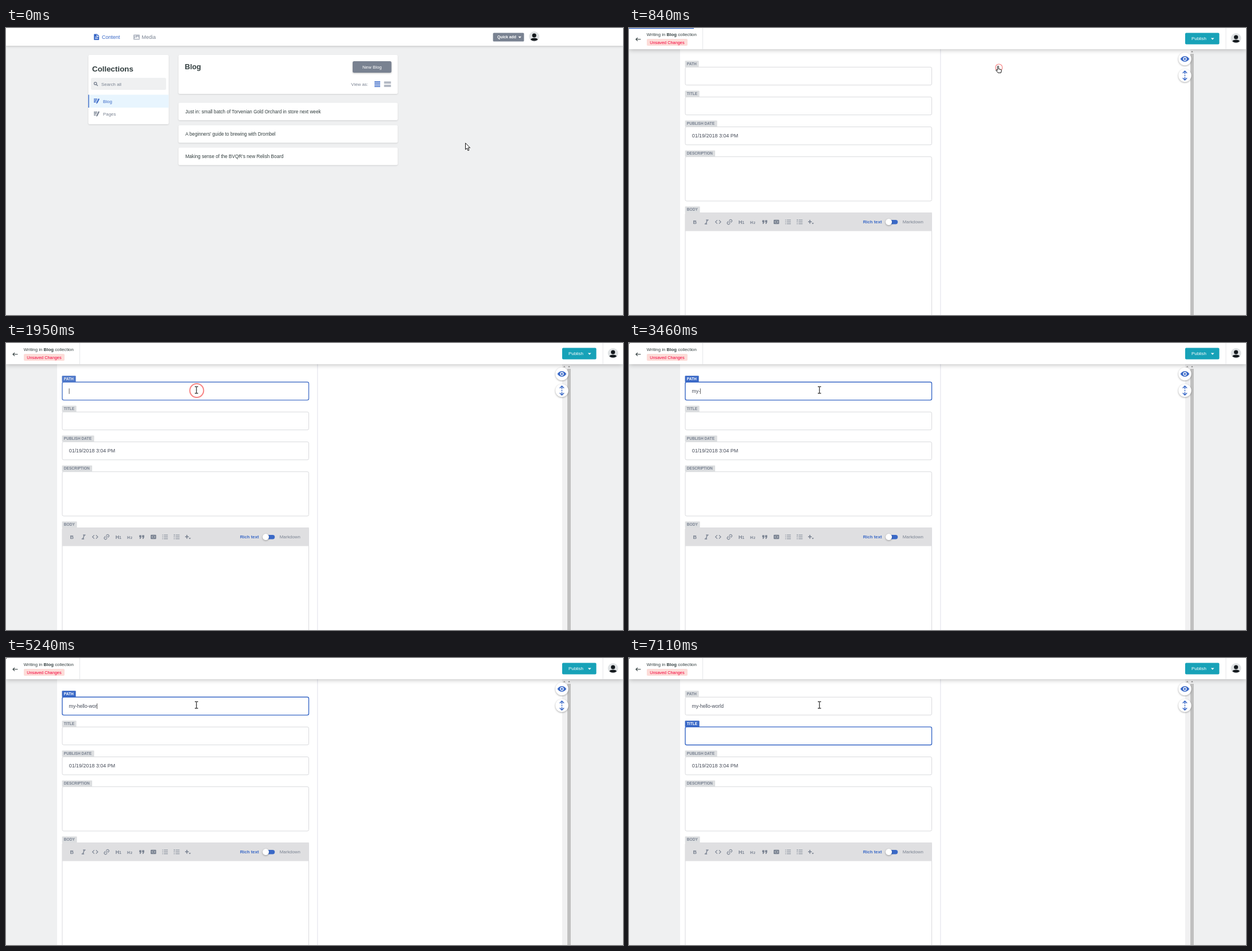
Animation of 1075x501 px, one loop 7990 ms. Source, as an HTML page:

```html
<!DOCTYPE html>
<html lang="en">
<head>
<meta charset="utf-8">
<title>New blog entry</title>
<style>
  html, body { margin: 0; width: 100%; height: 100%; overflow: hidden; background: #eff0f1; }
  svg { display: block; width: 100%; height: 100%; }
  text { font-family: "Liberation Sans", Arial, sans-serif; font-size: 7.9px; fill: #798291; white-space: pre; }
  .bold { font-weight: bold; }
  .blue { fill: #3a69c7; }
  .gray { fill: #798291; }
  .white { fill: #fff; }
  .dark { fill: #313d3e; }
  .card { fill: #fff; filter: drop-shadow(0 1px 1px #0002); }
  .entry { font-size: 8.2px; }
  .label { font-size: 6.6px; font-weight: bold; }
  .value { fill: #444a57; }
  .line { fill: none; stroke: #798291; stroke-width: 1.1; }
  .round { fill: #fff; filter: drop-shadow(0 1px 1.5px #0005); }
  .pointer { fill: #fff; stroke: #111; stroke-width: 1; stroke-linejoin: round; }
</style>
</head>
<body>
<svg viewBox="0 0 1075 501">
  <defs>
    <g id="avatar">
      <circle r="9" fill="#dfe2e4"/>
      <circle cy="-2" r="3.6" fill="#14191d"/>
      <path d="M-6.3 5.2Q-5.5 2.6 0 2.6T6.3 5.2Q3.5 7.6 0 7.6T-6.3 5.2Z" fill="#14191d"/>
    </g>
    <g id="write">
      <path d="M0 1.7H6M0 4.2H5M0 6.7H3.5" stroke="currentColor" stroke-width="1.4"/>
      <path d="M4.3 9.8L4.6 7.2L8 .3L10 1.3L6.5 8.2Z" fill="currentColor"/>
    </g>
  </defs>
  <rect width="1075" height="501" fill="#eff0f1"/>

  <g id="listPage">
    <rect width="1075" height="31" fill="#fff" style="filter:drop-shadow(0 1px 2px #0003)"/>
    <path class="blue" d="M154 10.5h5l3.2 3.2v6.5q0 .8-.8.8h-7.4q-.8 0-.8-.8v-8.9q0-.8.8-.8Z"/>
    <path d="M155.2 16h5M155.2 18.5h5M158.5 11.5v3h3" fill="none" stroke="#fff"/>
    <text class="blue" x="167" y="19" style="font-size:9px">Content</text>
    <rect x="222" y="11.5" width="11" height="9" rx="1" fill="#b3b9c4"/>
    <path d="M223.5 18.7l2.3-3 1.6 1.6 2.2-2.8 2.4 4.2Z" fill="#fff"/>
    <circle cx="225" cy="14" r="1" fill="#fff"/>
    <text x="236.5" y="19" style="font-size:9px">Media</text>
    <rect class="gray" x="848.5" y="8.5" width="54" height="15" rx="1.5"/>
    <text class="white bold" x="856" y="18.2" style="font-size:6.8px">Quick add</text>
    <path class="white" d="M892.5 14.8h5.4l-2.7 3Z"/>
    <use href="#avatar" x="920.3" y="15"/>

    <rect class="card" x="143.5" y="47" width="140" height="121" rx="2.5"/>
    <text class="dark bold" x="150" y="76" style="font-size:13.35px">Collections</text>
    <rect x="148" y="87" width="131" height="21" rx="2.5" fill="#eff0f1"/>
    <circle class="line" cx="155.7" cy="96.8" r="2.2" style="stroke-width:1.3"/>
    <path class="line" d="M157.4 98.5l2.5 2.5" style="stroke-width:1.5"/>
    <text x="166" y="100.5">Search all</text>
    <rect x="143.5" y="116.5" width="140" height="22.5" fill="#e8f5fe"/>
    <rect class="blue" x="143.3" y="116.5" width="1.4" height="22.5"/>
    <use href="#write" x="153" y="122.6" color="#3a69c7"/>
    <text class="blue" x="169" y="131">Blog</text>
    <use href="#write" x="153" y="145" color="#798291"/>
    <text x="169" y="153.3">Pages</text>

    <rect class="card" x="300.5" y="47" width="382" height="68" rx="2.5"/>
    <text class="dark bold" x="311.5" y="72" style="font-size:12.7px">Blog</text>
    <rect id="newButton" x="604" y="58" width="67.5" height="20" rx="2.5" style="filter:drop-shadow(0 1px 1.5px #0004)"/>
    <text class="white" x="637.8" y="70.8" text-anchor="middle">New Blog</text>
    <text x="601.3" y="101.2">View as:</text>
    <path d="M642 94.1h10M642 96.8h10M642 99.5h10M642 102.2h10" stroke="#3a69c7" stroke-width="1.6"/>
    <path d="M661 95.3h2M667 95.3h2M661 101h2M667 101h2" stroke="#b3b9c4" stroke-width="4" stroke-linecap="square" transform="translate(-.3 0)" stroke-linejoin="round"/>
    <rect class="card" x="300.5" y="130.5" width="382" height="30.5" rx="2.5"/>
    <text class="dark entry" x="312.5" y="148.6">Just in: small batch of Torvenian Gold Orchard in store next week</text>
    <rect class="card" x="300.5" y="169.7" width="382" height="30.5" rx="2.5"/>
    <text class="dark entry" x="312.5" y="187.7">A beginners’ guide to brewing with Drombel</text>
    <rect class="card" x="300.5" y="208.8" width="382" height="30.5" rx="2.5"/>
    <text class="dark entry" x="312.5" y="226.8">Making sense of the BVQR’s new Relish Board</text>
  </g>

  <g id="editPage">
    <rect x="89" y="37" width="889" height="464" fill="#fff"/>
    <g id="innerScroll">
      <rect x="969" y="37" width="9" height="464" fill="#f1f1f2"/>
      <path d="M970.8 42.3h4l-2-2.3Z" fill="#999"/>
    </g>
    <rect x="978" y="37" width="6.5" height="464" fill="#f1f1f2"/>
    <rect x="978" y="45" width="6" height="456" fill="#c0c0c0"/>
    <path d="M979 42.3h4l-2-2.3Z" fill="#888"/>
    <path d="M542.8 37v464" stroke="#dfe0ea"/>
    <rect width="1075" height="37" fill="#fff" style="filter:drop-shadow(0 1px 4px #0004)"/>
    <path d="M128.5 0v37M1040 0v37" stroke="#e6e7ea"/>
    <path d="M20.5 19.8h-8.5m3-2.8l-3 2.8l3 2.8" fill="none" stroke="#313d3e" stroke-width="1.1"/>
    <text class="dark" x="30.8" y="14.2" style="font-size:7.85px">Writing in <tspan class="bold">Blog</tspan> collection</text>
    <rect x="31" y="19" width="71" height="12" rx="2" fill="#fcdcd8"/>
    <text x="36.2" y="27.7" style="font-size:7.35px;fill:#f5003b">Unsaved Changes</text>
    <rect x="969" y="8.5" width="59.5" height="20" rx="2" fill="#17a2b8"/>
    <text class="white" x="980" y="21.2">Publish</text>
    <path class="white" d="M1013.8 17.4h5.8l-2.9 3.2Z"/>
    <use href="#avatar" x="1057.6" y="18"/>

    <circle class="round" cx="968.5" cy="54" r="11.2"/>
    <path class="blue" d="M960.7 54Q963.5 49.2 968.5 49.2T976.3 54Q973.5 58.8 968.5 58.8T960.7 54Z"/>
    <circle cx="968.5" cy="54" r="2.5" fill="#3a69c7" stroke="#fff" stroke-width="1.3"/>
    <circle class="round" cx="968.5" cy="83" r="11.2"/>
    <path d="M964.8 78.7l3.7-3.7l3.7 3.7M964.8 87.3l3.7 3.7l3.7-3.7M968.5 75.5v5M968.5 82v2M968.5 85.5v5" fill="none" stroke="#3a69c7" stroke-width="1.5"/>

    <g id="fields"></g>
    <text class="value" x="109.7" y="191" style="font-size:8.95px">01/19/2018 3:04 PM</text>
    <text class="value" id="path" x="109.6" y="87" style="font-size:8.5px"></text>
    <rect id="caret" y="79.3" width=".8" height="9.6" fill="#333"/>

    <rect x="97.8" y="322" width="430" height="32.5" fill="#dfdfe1"/>
    <text class="bold" x="111.6" y="342" style="font-size:9px">B</text>
    <path class="line" d="M134.2 335.3h4.3M131.8 342h4.3M136.5 335.3l-2.6 6.7" style="stroke-width:1.4"/>
    <path class="line" d="M153.8 335.3l-3.2 3.2l3.2 3.2M156.8 335.3l3.2 3.2l-3.2 3.2"/>
    <g transform="rotate(-45 175.3 338.5)"><path class="line" d="M174.5 336.3h-2a2.2 2.2 0 0 0 0 4.4h2M176 336.3h2a2.2 2.2 0 0 1 0 4.4h-2M173.2 338.5h4.2"/></g>
    <text class="bold" x="190.8" y="342" style="font-size:9px">H<tspan style="font-size:6.5px">1</tspan></text>
    <text class="bold" x="211" y="342.4" style="font-size:7px">H<tspan dx=".6" style="font-size:6px">2</tspan></text>
    <path class="gray" d="M232.2 335.5h3.6v3.6l-1.5 3h-1.7l1.2-2.8h-1.6ZM237.2 335.5h3.6v3.6l-1.5 3h-1.7l1.2-2.8h-1.6Z"/>
    <rect class="gray" x="252" y="334.8" width="9.6" height="7.5" rx="1.2"/>
    <path d="M255.8 336.7l-1.8 1.8l1.8 1.8M257.8 336.7l1.8 1.8l-1.8 1.8" fill="none" stroke="#dfdfe1"/>
    <path class="line" d="M275 335.2h7M275 338.5h7M275 341.8h7M272.2 335.2h1.5M272.2 338.5h1.5M272.2 341.8h1.5M295.4 335.2h7M295.4 338.5h7M295.4 341.8h7M293.2 334v2.6M292.3 338.5h1.7M292.3 341.8h1.7"/>
    <path class="line" d="M312 338.3h6.4M315.2 335.1v6.4" style="stroke-width:1.6"/>
    <path class="gray" d="M318.2 340.2h4l-2 2.2Z"/>
    <text class="blue bold" x="407.7" y="341.3" style="font-size:7.8px">Rich text</text>
    <rect class="blue" x="448.5" y="335" width="19.8" height="7.4" rx="3.7"/>
    <circle class="round" cx="452.6" cy="338.6" r="5.5"/>
    <text x="476.8" y="341.3" style="font-size:7.8px">Markdown</text>
    <rect class="blue" id="progress" height="1.3"/>
    <rect id="corner" width="1" height="1"/>
  </g>

  <circle id="ring" fill="none" stroke="#f02020" stroke-opacity=".55"/>
  <g id="cursor">
    <path class="pointer" d="M0 0V11.3L2.6 9L4.4 13.2L6.3 12.4L4.5 8.3H8Z"/>
    <path class="pointer" d="M-1 1a1 1 0 0 1 2 0v4l4 1q1 .3 1 1.7l-1 4h-5l-3.5-4q-.3-1.6 1-1.1l1.5 1Z"/>
    <path d="M-2.8-5.7H-.8L0-5.2L.8-5.7H2.8M0-5.2V5.2M-2.8 5.7H-.8L0 5.2L.8 5.7H2.8" fill="none" stroke="#444" stroke-width="1.4"/>
  </g>
</svg>
<script>
const LOOP = 7990;
const $ = id => document.getElementById(id);
const show = (el, on) => el.style.display = on ? '' : 'none';

// Labelled form fields: name, top of label, height of box, width of label
const field = (name, y, h, w, focusable) => {
  const part = (tag, edge, ink, width, attrs = '') => `<g ${attrs}>
    <rect x="98" y="${y + 11}" width="429.5" height="${h}" rx="2.5" fill="#fff" stroke="${edge}" stroke-width="${width}"/>
    <rect x="97.6" y="${y}" width="${w}" height="11" rx="1" fill="${tag}"/>
    <text class="label" x="100.8" y="${y + 7.7}" style="fill:${ink}">${name}</text></g>`;
  return part('#dcdee0', '#d9dadd', '#798291', 1) +
    (focusable ? part('#3a69c7', '#3a69c7', '#fff', 1.4, `id="focus${name}"`) : '');
};
$('fields').innerHTML =
  field('PATH', 57.3, 31.3, 24, true) +
  field('TITLE', 109.4, 31.3, 25, true) +
  field('PUBLISH DATE', 161.6, 31.3, 56) +
  field('DESCRIPTION', 213.7, 77.3, 52.5) +
  field('BODY', 311.6, 200, 26);

// Held values: each entry applies from its time until the next one
const ARROW = 0, HAND = 1, BEAM = 2;
const cursorSteps = [
  [0, 800.5, 200.8, ARROW], [100, 735, 167, ARROW], [130, 667, 132, ARROW],
  [280, 655, 88, ARROW], [430, 643, 66.5, HAND], [990, 615, 69, ARROW],
  [1120, 490, 72, BEAM], [1250, 380, 74, BEAM], [1400, 335, 75, BEAM], [1680, 331.8, 82, BEAM]
];
const ringSteps = [[0, 0], [710, 18, 644.5, 68.5], [840, 6, 644.5, 69], [990, 0], [1950, 12, 332.3, 83], [2070, 0]];
const progressSteps = [[0, 113], [990, 190], [1120, 260], [1250, 330], [1400, 1075], [1680, 0]];
const typedSteps = [[0, 0], [2570, 1], [3050, 3], [4040, 5], [4250, 7], [4380, 8], [4540, 9], [5010, 10], [5240, 12], [5440, 14]];
const pathFocus = [[0, 0], [1950, .87], [2070, 1], [6960, .4], [7110, 0]];
const titleFocus = [[0, 0], [6960, .6], [7110, 1]];
const at = (steps, t) => steps.findLast(step => step[0] <= t).slice(1);

function draw(t) {
  const editing = t >= 840;
  show($('listPage'), !editing);
  show($('editPage'), editing);
  $('newButton').setAttribute('fill', t < 430 ? '#798291' : '#555a65');

  const [x, y, shape] = at(cursorSteps, t);
  $('cursor').setAttribute('transform', `translate(${x} ${y})`);
  [...$('cursor').children].forEach((el, i) => show(el, i === shape));

  const [radius, cx = 0, cy = 0] = at(ringSteps, t);
  const ring = $('ring');
  show(ring, radius);
  ring.setAttribute('r', radius);
  ring.setAttribute('cx', cx);
  ring.setAttribute('cy', cy);
  ring.setAttribute('stroke-width', radius > 10 ? 2 : 1.2);

  if (!editing) return;
  show($('innerScroll'), t >= 990);
  $('progress').setAttribute('width', at(progressSteps, t)[0]);
  $('progress').setAttribute('opacity', t >= 1530 ? .5 : 1);
  show($('corner'), t >= 3460);
  $('focusPATH').setAttribute('opacity', at(pathFocus, t)[0]);
  $('focusTITLE').setAttribute('opacity', at(titleFocus, t)[0]);

  const path = $('path');
  path.textContent = 'my-hello-world'.slice(0, at(typedSteps, t)[0]);
  $('caret').setAttribute('x', 109.7 + path.getComputedTextLength());
  show($('caret'), t >= 1950 && t < 6960 && !(t >= 6000 && t < 6460));
}

const start = performance.now();
function tick() {
  draw((performance.now() - start) % LOOP);
  requestAnimationFrame(tick);
}
tick();
</script>
</body>
</html>
```
